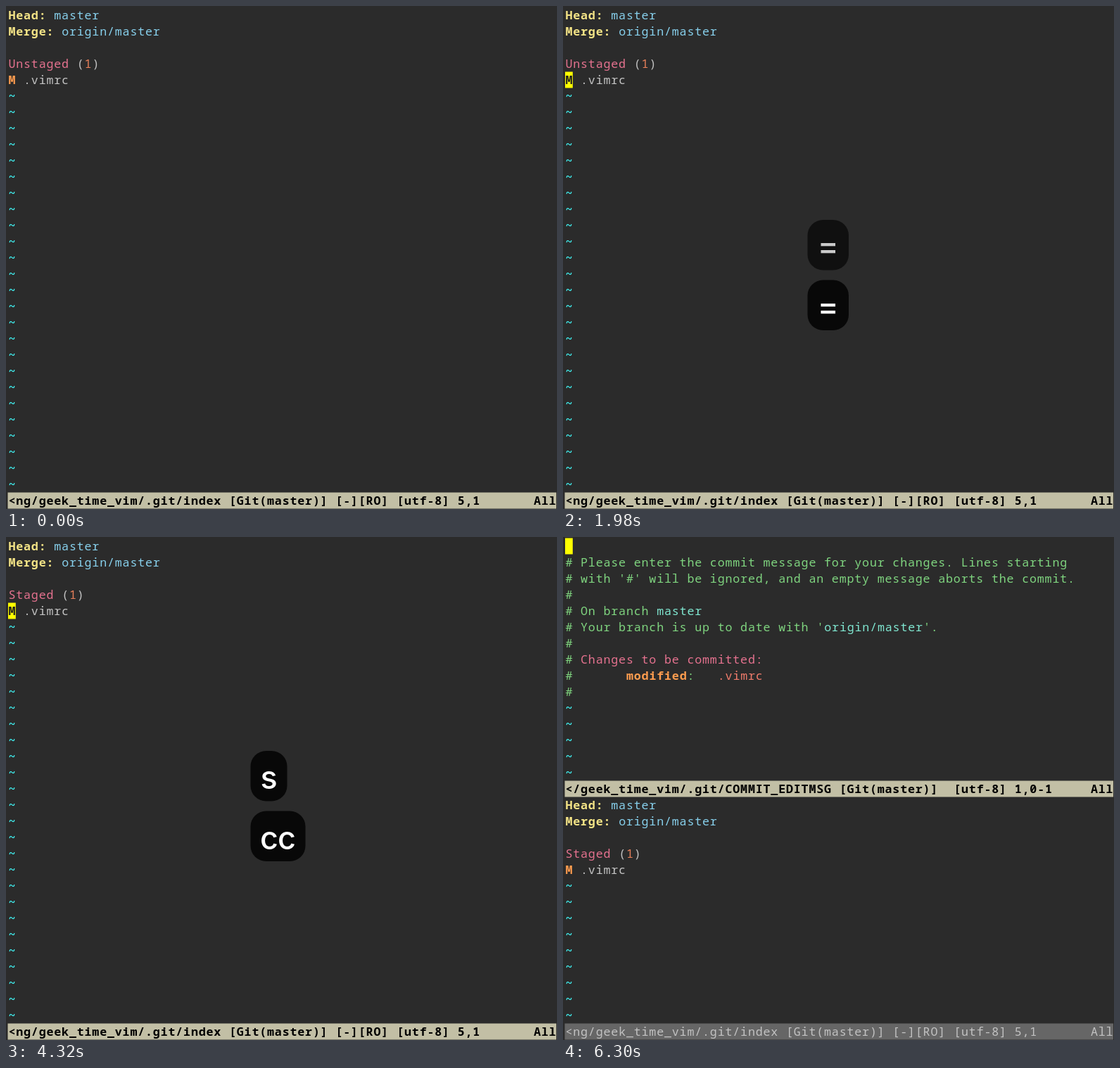
These frames come from a looping animation (783 by 715 pixels, 6.36 s). An HTML page:

```html
<!DOCTYPE html>
<html lang="en">
<head>
<meta charset="utf-8">
<title>Git status in Vim</title>
<style>
  html, body { margin: 0; width: 100%; height: 100%; overflow: hidden; background: #2b2b2b; }
  svg { display: block; width: 783px; height: 715px; }
  text { white-space: pre; }
  .mono { font: 350 16.7px "Noto Sans Mono", "DejaVu Sans Mono", monospace; letter-spacing: .8px; }
  .bold { font-weight: 800; }
  .cjk { font: 350 17.6px "Noto Sans CJK SC", "Noto Sans CJK", sans-serif; letter-spacing: 4px; }
  .key { font: 500 45px Inter, "Liberation Sans", sans-serif; letter-spacing: -1px; fill: #fff; }
</style>
</head>
<body>
<svg id="stage" viewBox="0 0 783 715"></svg>
<script>
const LOOP = 6360, STEP = 60;
const CELL = 10.82, ROW = 23, LEFT = 3, TOP = 1.5, BASELINE = 17.5, BEARING = .4;
const C = {
  khaki: '#f3e386', sky: '#87d0ec', pink: '#e5728f', orange: '#ff9d4f', number: '#e8805a',
  text: '#c2c2c2', cyan: '#40f5f5', green: '#7fd47f', aqua: '#7fe6d0', coral: '#f07c6c',
  bar: '#c2bfa5', dimBar: '#666666', yellow: '#ffff00'
};

const stage = document.getElementById('stage');

function el(parent, tag, attrs = {}, content = '') {
  const node = document.createElementNS('http://www.w3.org/2000/svg', tag);
  for (const name in attrs) node.setAttribute(name, attrs[name]);
  node.textContent = content;
  return parent.appendChild(node);
}
const group = (parent = stage) => el(parent, 'g');
const show = (node, on) => node.setAttribute('display', on ? 'inline' : 'none');
const rowTop = row => TOP + row * ROW;

// Writes text on the cell grid; CJK characters take two cells each.
function write(parent, row, col, text, fill, bold = false) {
  for (const run of text.match(/[\u3000-\u9fff\uff00-\uffef]+|[^\u3000-\u9fff\uff00-\uffef]+/g)) {
    const wide = run.charCodeAt(0) >= 0x3000;
    el(parent, 'text', {
      x: LEFT + BEARING + col * CELL, y: rowTop(row) + BASELINE, fill,
      class: wide ? 'cjk' : bold ? 'mono bold' : 'mono'
    }, run);
    col += run.length * (wide ? 2 : 1);
  }
}

function tildes(parent, from, to) {
  for (let row = from; row <= to; row++) write(parent, row, 0, '~', C.cyan, true);
}

function statusBar(parent, row, left, position, scroll, active = true) {
  el(parent, 'rect', { x: 2.5, y: rowTop(row), width: 779.5, height: ROW, fill: active ? C.bar : C.dimBar });
  const color = active ? '#000' : C.text;
  write(parent, row, 0, left, color, active);
  write(parent, row, 51, '[utf-8] ' + position, color, active);
  write(parent, row, 69, scroll, color, active);
}
const indexBar = (parent, scroll, active) =>
  statusBar(parent, 30, '<ng/geek_time_vim/.git/index [Git(master)] [-][RO]', '5,1', scroll, active);

function summary(parent, top, section) {
  const n = section.length;
  write(parent, top, 0, 'Head:', C.khaki, true);
  write(parent, top, 6, 'master', C.sky);
  write(parent, top + 1, 0, 'Merge:', C.khaki, true);
  write(parent, top + 1, 7, 'origin/master', C.sky);
  write(parent, top + 3, 0, section, C.pink);
  write(parent, top + 3, n + 1, '(', C.text);
  write(parent, top + 3, n + 2, '1', C.number);
  write(parent, top + 3, n + 3, ')', C.text);
  write(parent, top + 4, 0, 'M', C.orange, true);
  write(parent, top + 4, 2, '.vimrc', C.text);
}

function statusScreen(section) {
  const g = group();
  summary(g, 0, section);
  tildes(g, 5, 29);
  indexBar(g, 'All');
  return g;
}

function diffScreen() {
  const g = group();
  const types = ['c', 'cpp', 'java', 'python', 'vim', 'sh', 'zsh'];
  const maps = { fi: 'FixIt', gt: 'GoTo', gd: 'GoToDefinition', gh: 'GoToDeclaration', gr: 'GoToReferences' };
  const added = [
    '" 用于 YouCompleteMe 的设定',
    "let g:ycm_auto_hover = ''",
    'let g:ycm_filetype_whitelist = {',
    ...types.map(type => `      \\ '${type}': 1,`),
    '      \\ }',
    "let g:ycm_goto_buffer_command = 'split-or-existing-window'",
    "let g:ycm_key_invoke_completion = '<C-Z>'",
    'let g:ycm_use_clangd = 1',
    ...Object.keys(maps).map(key => `nnoremap <Leader>${key} :YcmCompleter ${maps[key]}<CR>`),
    ''
  ];
  summary(g, 0, 'Unstaged');
  write(g, 5, 0, '@@ -162,6 +162,26 @@', C.khaki, true);
  write(g, 5, 21, "if has('autocmd')", C.pink);
  write(g, 6, 3, '" 异步运行命令时打开 quickfix 窗口，高度为 10 行', C.text);
  write(g, 7, 3, 'let g:asyncrun_open = 10', C.text);
  added.forEach((line, i) => write(g, 9 + i, 0, '+  ' + line, C.sky));
  write(g, 29, 0, '@@@', C.cyan, true);
  indexBar(g, 'Top');
  return g;
}

function commitScreen() {
  const g = group();
  for (let row = 1; row <= 9; row++) write(g, row, 0, '#', C.green);
  write(g, 1, 2, 'Please enter the commit message for your changes. Lines starting', C.green);
  write(g, 2, 2, "with '#' will be ignored, and an empty message aborts the commit.", C.green);
  write(g, 4, 2, 'On branch', C.green);
  write(g, 4, 12, 'master', C.aqua);
  write(g, 5, 2, 'Your branch is up to date with', C.green);
  write(g, 5, 33, "'", C.green);
  write(g, 5, 34, 'origin/master', C.aqua);
  write(g, 5, 47, "'.", C.green);
  write(g, 7, 2, 'Changes to be committed:', C.pink);
  write(g, 8, 8, 'modified', C.orange, true);
  write(g, 8, 16, ':', C.green);
  write(g, 8, 20, '.vimrc', C.coral);
  tildes(g, 10, 14);
  statusBar(g, 15, '</geek_time_vim/.git/COMMIT_EDITMSG [Git(master)]', '1,0-1', 'All');
  summary(g, 16, 'Staged');
  tildes(g, 21, 29);
  indexBar(g, 'All', false);
  return g;
}

function cursorBlock(row, letter) {
  const g = group();
  el(g, 'rect', { x: LEFT, y: rowTop(row), width: CELL, height: ROW, fill: C.yellow });
  if (letter) write(g, row, 0, letter, '#1c1c1c', true);
  return g;
}

const unstaged = statusScreen('Unstaged');
const diff = diffScreen();
const staged = statusScreen('Staged');
const commit = commitScreen();
const fileCursor = cursorBlock(4, 'M');
const messageCursor = cursorBlock(0);

const scenes = [[0, unstaged], [360, diff], [1740, unstaged], [2820, staged], [4380, commit]];
const wakeTimes = [-770, 360, 1740, 2820, 4080, 4260, 4380];

// Key captions: pressed at start, pushed up by the next one, faded after a delay.
const HOLD = 1570, FADE = 200;
const keys = [
  { label: '=', start: 360, pushed: 1740, width: 58.5 },
  { label: '=', start: 1740, pushed: 2820, width: 58.5 },
  { label: 's', start: 2820, pushed: 4080, width: 52 },
  { label: 'c', start: 4080, end: 4260, width: 54 },
  { label: 'cc', start: 4260, width: 78 }
];
for (const key of keys) {
  key.node = group();
  el(key.node, 'rect', { x: 347.5, y: 389.5, width: key.width, height: 71.5, rx: 22, 'fill-opacity': .82 });
  el(key.node, 'text', {
    x: 347 + key.width / 2, y: key.label === '=' ? 442.5 : 443.5, 'text-anchor': 'middle', class: 'key'
  }, key.label);
}

function cursorLit(t) {
  const idle = t - wakeTimes.filter(w => w <= t).pop();
  return idle < 700 || (idle - 700) % 650 >= 250;
}

function render(t) {
  const current = scenes.filter(([start]) => start <= t).pop()[1];
  for (const screen of [unstaged, diff, staged, commit]) show(screen, screen === current);

  const lit = cursorLit(t);
  show(fileCursor, lit && current !== commit);
  show(messageCursor, lit && current === commit);

  for (const { node, start, end = LOOP, pushed = LOOP } of keys) {
    const opacity = Math.min(1, Math.max(0, 1 - (t - start - HOLD) / FADE));
    show(node, t >= start && t < end && opacity > 0);
    node.setAttribute('opacity', opacity);
    node.setAttribute('transform', `translate(0 ${t >= pushed ? -85.5 : 0})`);
  }
}

const origin = performance.now();
function tick() {
  const t = (performance.now() - origin) % LOOP;
  render(Math.floor(t / STEP) * STEP);
  requestAnimationFrame(tick);
}
tick();
</script>
</body>
</html>
```
